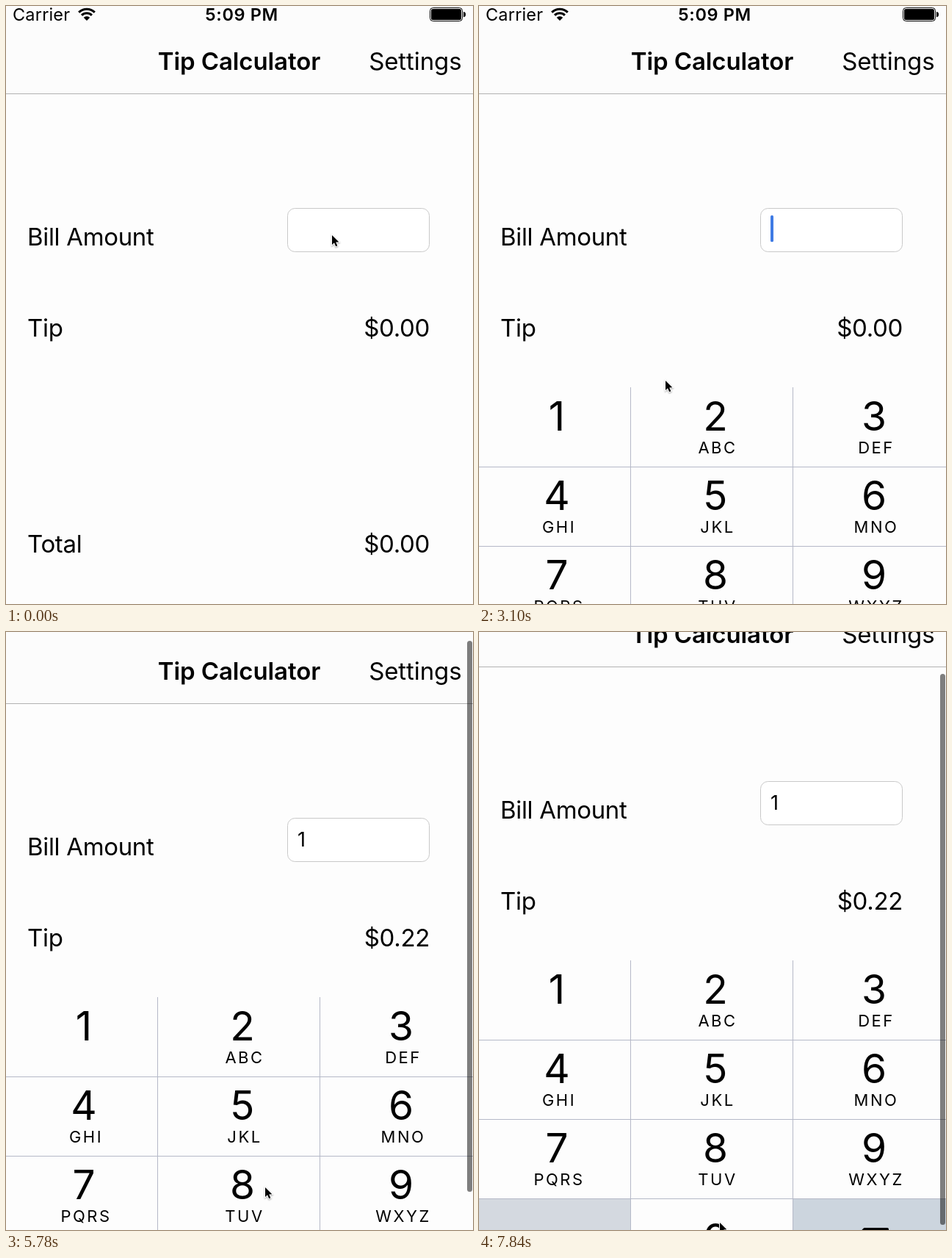
Recreate the animation shown at these times as an HTML page with a canvas. Size 636 by 814 pixels, loop 7.99 s.

```html
<!DOCTYPE html>
<html lang="en">
<head>
<meta charset="utf-8">
<title>Tip Calculator</title>
<style>
html, body { margin: 0; width: 100%; height: 100%; overflow: hidden; background: #fdfdfd; }
canvas { display: block; width: 636px; height: 814px; }
</style>
</head>
<body>
<canvas id="stage" width="636" height="814"></canvas>
<script>
const W = 636, H = 814, LOOP = 7990, STEP = LOOP / 54;
const BG = '#fdfdfd', LINE = '#b5b9c8', KEY_GRAY = '#d4d9e0';
const FONT = 'Inter, "Liberation Sans", sans-serif';
const ctx = document.getElementById('stage').getContext('2d');

// Key moments in ms
const FOCUS = 1775, PRESS = 3985, TYPED = 4135, BLINK = 1036;

const clamp = v => Math.min(1, Math.max(0, v));
const smooth = u => u * u * (3 - 2 * u);
const glide = (t, start, end) => smooth(clamp((t - start) / (end - start)));

function scrollAt(t) {
  return Math.round(
    22 * glide(t, 5340, 5770) + 18 * glide(t, 5930, 6800) + 32 * glide(t, 6960, 7830));
}

function keypadTop(t) {
  const u = clamp((t - 1628) / 486);
  return Math.round(519 + (H - 519) * (1 - u) ** 3);
}

function caretAlpha(t) {
  if (t < FOCUS) return 0;
  const peak = t < TYPED ? FOCUS + STEP : TYPED + STEP / 2;
  return clamp(0.5 + 1.5 * Math.cos((t - peak) / BLINK * Math.PI * 2));
}

function cursorAt(t) {
  let x = 444, y = 312;
  const move = (start, end, dx, dy) => {
    const k = glide(t, start, end);
    x += dx * k;
    y += dy * k;
  };
  move(890, 1325, -35, 63);    // off the field
  move(2520, 3100, -182, 158); // toward key 1
  move(2960, 3550, -93, 41);
  move(4440, 4730, 219, 182);  // toward key 8
  move(7400, 7830, -25, 48);
  return [Math.round(x), Math.round(y)];
}

function rect(x, y, w, h, color) {
  ctx.fillStyle = color;
  ctx.fillRect(x, y, w, h);
}

function round(x, y, w, h, r) {
  ctx.beginPath();
  ctx.roundRect(x, y, w, h, r);
}

function text(str, x, y, size, { align = 'left', weight = 400, gap = 0 } = {}) {
  ctx.font = `${weight} ${size}px ${FONT}`;
  ctx.letterSpacing = gap + 'px';
  ctx.textAlign = align;
  ctx.fillStyle = '#000';
  ctx.fillText(str, x, y);
}

function label(str, x, y, opts) {
  text(str, x, y, 33, { gap: -0.33, ...opts });
}

function drawStatus() {
  text('Carrier', 9, 20, 23.5, { gap: 0.2 });
  text('5:09 PM', 321, 20, 23.5, { align: 'center', weight: 600, gap: 0.6 });

  // Wi-Fi
  const a = -Math.PI * 0.75, b = -Math.PI * 0.25;
  ctx.strokeStyle = '#000';
  ctx.lineWidth = 3;
  for (const r of [15.3, 9.8]) {
    ctx.beginPath();
    ctx.arc(110, 19.5, r, a, b);
    ctx.stroke();
  }
  ctx.beginPath();
  ctx.moveTo(110, 20);
  ctx.arc(110, 20, 6, a, b);
  ctx.fill();

  // Battery
  ctx.lineWidth = 1;
  round(577.5, 2.5, 44, 18, 4);
  ctx.stroke();
  round(579, 4, 41, 15, 2.5);
  ctx.fill();
  round(623, 8, 3, 7, [0, 3, 3, 0]);
  ctx.fill();
}

function drawForm(typed) {
  rect(0, 0, W, 119, '#fcfcfc');
  rect(0, 119, W, 1, '#b2b2b2');
  drawStatus();
  label('Tip Calculator', 317.5, 87, { align: 'center', weight: 600, gap: -0.1 });
  label('Settings', 620.5, 87, { align: 'right', gap: -0.1 });

  label('Bill Amount', 29, 326);
  label('Tip', 29, 450);
  label('Total', 29, 744);
  label(typed ? '$0.22' : '$0.00', 577, 450, { align: 'right' });
  label(typed ? '$1.22' : '$0.00', 577, 744, { align: 'right' });

  round(383.5, 275.5, 193, 59, 10);
  ctx.fillStyle = '#fff';
  ctx.fill();
  ctx.strokeStyle = '#c9c9c9';
  ctx.lineWidth = 1;
  ctx.stroke();
  if (typed) text('1', 397, 314, 27);
}

function drawCaret(typed, alpha) {
  ctx.globalAlpha = alpha;
  ctx.fillStyle = '#3f7be4';
  round(typed ? 408 : 397, 285, 4, 36, 1.5);
  ctx.fill();
  ctx.globalAlpha = 1;
}

function drawDelete(x, y) {
  ctx.beginPath();
  ctx.moveTo(x, y + 14);
  ctx.lineTo(x + 13, y);
  ctx.lineTo(x + 44, y);
  ctx.lineTo(x + 44, y + 28);
  ctx.lineTo(x + 13, y + 28);
  ctx.closePath();
  ctx.strokeStyle = '#000';
  ctx.lineWidth = 4;
  ctx.lineJoin = 'round';
  ctx.stroke();
}

function drawKeypad(y, pressed) {
  const words = ' ABC DEF GHI JKL MNO PQRS TUV WXYZ'.split(' ');
  const colX = c => 106 + c * 216 - (c - 1) * 0 - 5 * 0;
  const row = 108;
  rect(0, y, W, row * 4, BG);
  rect(0, y + row * 3, 206, row, KEY_GRAY);
  rect(428, y + row * 3, 208, row, '#ccd5de');
  if (pressed) rect(0, y, 206, row, KEY_GRAY);

  words.forEach((word, i) => {
    const x = colX(i % 3), top = y + Math.floor(i / 3) * row;
    text(String(i + 1), x, top + 59, 55, { align: 'center' });
    text(word, x + 3, top + 90, 22, { align: 'center', gap: 2.5 });
  });
  text('0', colX(1), y + 398, 55, { align: 'center' });
  drawDelete(512, y + 366);

  for (const x of [206, 427]) rect(x, y, 1, row * 4, LINE);
  for (let i = 1; i < 4; i++) rect(0, y + i * row, W, 1, LINE);
}

function drawCursor([x, y]) {
  ctx.save();
  ctx.translate(x, y);
  ctx.beginPath();
  ctx.moveTo(0, 0);
  ctx.lineTo(0, 13);
  ctx.lineTo(3, 10.3);
  ctx.lineTo(5.2, 15.2);
  ctx.lineTo(7.4, 14.2);
  ctx.lineTo(5.2, 9.5);
  ctx.lineTo(9.3, 9.2);
  ctx.closePath();
  ctx.shadowColor = 'rgba(0,0,0,0.35)';
  ctx.shadowBlur = 2;
  ctx.shadowOffsetY = 1;
  ctx.lineJoin = 'miter';
  ctx.lineWidth = 2;
  ctx.strokeStyle = '#fff';
  ctx.stroke();
  ctx.shadowColor = 'transparent';
  ctx.fillStyle = '#000';
  ctx.fill();
  ctx.restore();
}

function draw(t) {
  const scroll = scrollAt(t), top = keypadTop(t), typed = t >= TYPED;
  rect(0, 0, W, H, BG);

  ctx.save();
  ctx.translate(0, -scroll);
  drawForm(typed);
  drawCaret(typed, caretAlpha(t));
  if (top < H) drawKeypad(top, t >= PRESS && !typed);
  ctx.restore();

  if (scroll) {
    ctx.fillStyle = 'rgba(0,0,0,0.5)';
    round(628, Math.round(scroll * 0.9 - 8), 7, 750, 3.5);
    ctx.fill();
  }
  drawCursor(cursorAt(t));
}

const began = performance.now();
function tick() {
  const t = (performance.now() - began) % LOOP;
  draw(Math.floor((t + 6) / STEP) % 54 * STEP);
  requestAnimationFrame(tick);
}
tick();
</script>
</body>
</html>
```
